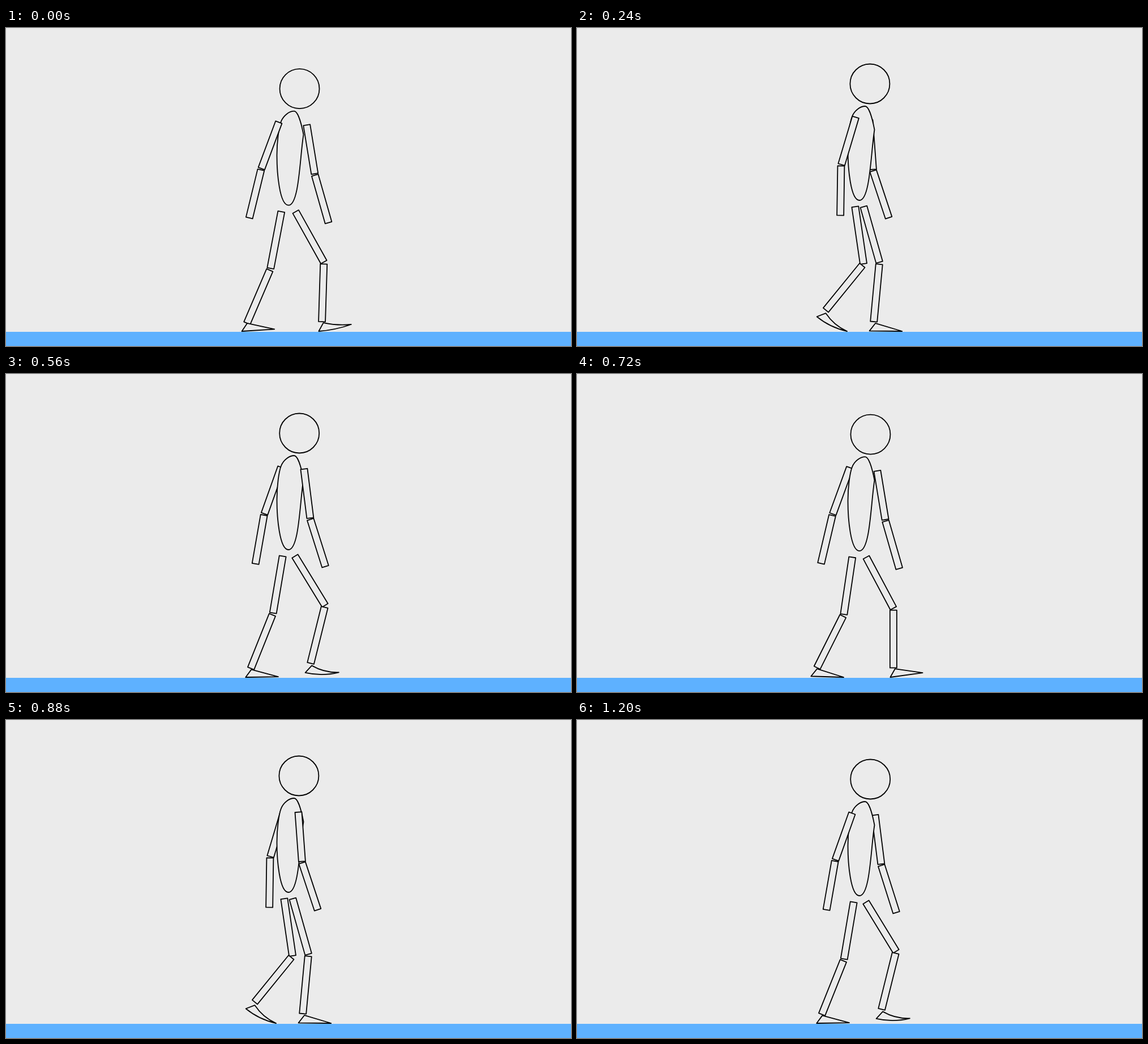
Write an HTML page with a canvas that moves like this. It is 998 px wide and 561 px high and loops after 1280 ms.

```html
<!DOCTYPE html>
<html lang="en">
<head>
<meta charset="utf-8">
<title>Walk cycle</title>
<style>
html, body { margin: 0; width: 100%; height: 100%; overflow: hidden; background: #ebebeb; }
canvas { display: block; }
</style>
</head>
<body>
<canvas id="stage" width="998" height="561"></canvas>
<script>
const ctx = document.getElementById('stage').getContext('2d');
const STEP = 80, CYCLE = 16, GROUND = 536;
const PAPER = '#ebebeb', BLUE = '#5eb1ff';
const ARM = 87.2, LEG = 101.8;

// Harmonic motion: a mean plus [cosine, sine] amplitudes for each multiple of the phase.
function wave(phase, mean, ...harmonics) {
  return harmonics.reduce((sum, [a, b], i) =>
    sum + a * Math.cos((i + 1) * phase) + b * Math.sin((i + 1) * phase), mean);
}

// Angles are degrees from straight down, positive forward.
function reach([x, y], angle, length) {
  const r = angle * Math.PI / 180;
  return [x + Math.sin(r) * length, y + Math.cos(r) * length];
}

function paint(path) {
  ctx.fill(path);
  ctx.stroke(path);
}

// Draws a bar hanging from a point and returns its lower end.
function bar(top, angle, length) {
  const end = reach(top, angle, length), path = new Path2D();
  path.moveTo(...reach(top, angle + 90, 6));
  path.lineTo(...reach(top, angle - 90, 6));
  path.lineTo(...reach(end, angle - 90, 6));
  path.lineTo(...reach(end, angle + 90, 6));
  path.closePath();
  paint(path);
  return end;
}

// A limb is furthest forward near phase 0 and furthest back near phase pi.
function drawArm(phase, headY) {
  const shoulder = [
    wave(phase, 505.2, [23.7, 4.5], [1.3, 0], [1, 0.3]),
    headY + wave(phase, 61.5, [2.4, 1.8])
  ];
  const upper = wave(phase, -6.2, [15.5, 3.9], [0.6, 0.6], [-0.6, -0.9]);
  const fore = wave(phase, 6.3, [15.8, 2.6], [-5.2, -1.7], [-1, -0.6]);
  const elbow = bar(shoulder, upper, ARM);
  bar(reach(elbow, upper, 2.5), fore, ARM);
}

function drawLeg(phase, headY) {
  const hip = [wave(phase, 499.2, [12.4, 3.1], [-0.2, -0.7], [0.3, -0.5]), headY + 216.8];
  const thigh = wave(phase, 10.1, [21.7, -6.1], [0.4, 1.2], [-1.7, 1.3], [-1.3, -1.4]);
  const shin = wave(phase, -19, [8.4, 16.4], [4.8, 1.7], [2.3, -1.7], [1.7, 1.1]);
  const heel = wave(phase, -46.5, [-0.2, 18.2], [13.5, 3.7], [2.8, -3.3], [1.7, 0]);
  const bend = 5 * Math.max(0, Math.cos(phase - 13 * Math.PI / 8));
  const knee = bar(hip, thigh, LEG);
  const [x, y] = bar(reach(knee, shin, 3.5), shin, LEG);
  drawFoot([x + wave(phase, 1.4, [1.1, 1.1]), y + 2.3 + bend / 2], heel, bend);
}

// Control point of a curve that sags by the given amount at its middle.
function sag([x1, y1], [x2, y2], amount) {
  const dx = x2 - x1, dy = y2 - y1, s = 2 * amount / Math.hypot(dx, dy);
  return [(x1 + x2) / 2 - dy * s, (y1 + y2) / 2 + dx * s];
}

function drawFoot(ankle, heelAngle, bend) {
  const place = () => [reach(ankle, heelAngle, 17), reach(ankle, heelAngle + 111.5 + 2 * bend, 49.3)];
  let [heel, toe] = place();
  const gap = GROUND - 1 - Math.max(heel[1], toe[1]);
  if (gap < 2) {            // a foot this close stands on the ground
    ankle[1] += gap;
    [heel, toe] = place();
  }
  const path = new Path2D();
  path.moveTo(...heel);
  path.lineTo(...ankle);
  path.quadraticCurveTo(...sag(ankle, toe, bend), ...toe);
  path.quadraticCurveTo(...sag(heel, toe, bend), ...heel);
  path.closePath();
  paint(path);
}

const torso = new Path2D('M509 39.5C515 39.5 521 57.5 525.5 81C519 120.5 518 205.5 499 205.5' +
  'C483 205.5 478.5 147.5 478.5 117.5C478.5 92.5 482 67.5 486 57.5C490 47.5 500 39.5 509 39.5Z');

function drawBody(headY) {
  ctx.save();
  ctx.translate(0, headY);
  paint(torso);
  const head = new Path2D();
  head.arc(517.2 + Math.max(0, headY - 97) * 0.13, 0, 35, 0, Math.PI * 2);
  paint(head);
  ctx.restore();
}

function draw(now) {
  const phase = Math.floor(now / STEP) % CYCLE / CYCLE * 2 * Math.PI;
  const opposite = phase + Math.PI;
  const headY = wave(2 * phase, 101.5, [5.7, 1.45]);
  ctx.fillStyle = PAPER;
  ctx.fillRect(0, 0, 998, 561);
  ctx.fillStyle = BLUE;
  ctx.fillRect(0, GROUND, 998, 25);
  ctx.fillStyle = PAPER;
  ctx.strokeStyle = '#000';
  ctx.lineWidth = 1.8;
  ctx.lineJoin = 'round';
  drawArm(phase, headY);
  drawLeg(opposite, headY);
  drawBody(headY);
  drawLeg(phase, headY);
  drawArm(opposite, headY);
  requestAnimationFrame(draw);
}
requestAnimationFrame(draw);
</script>
</body>
</html>
```
